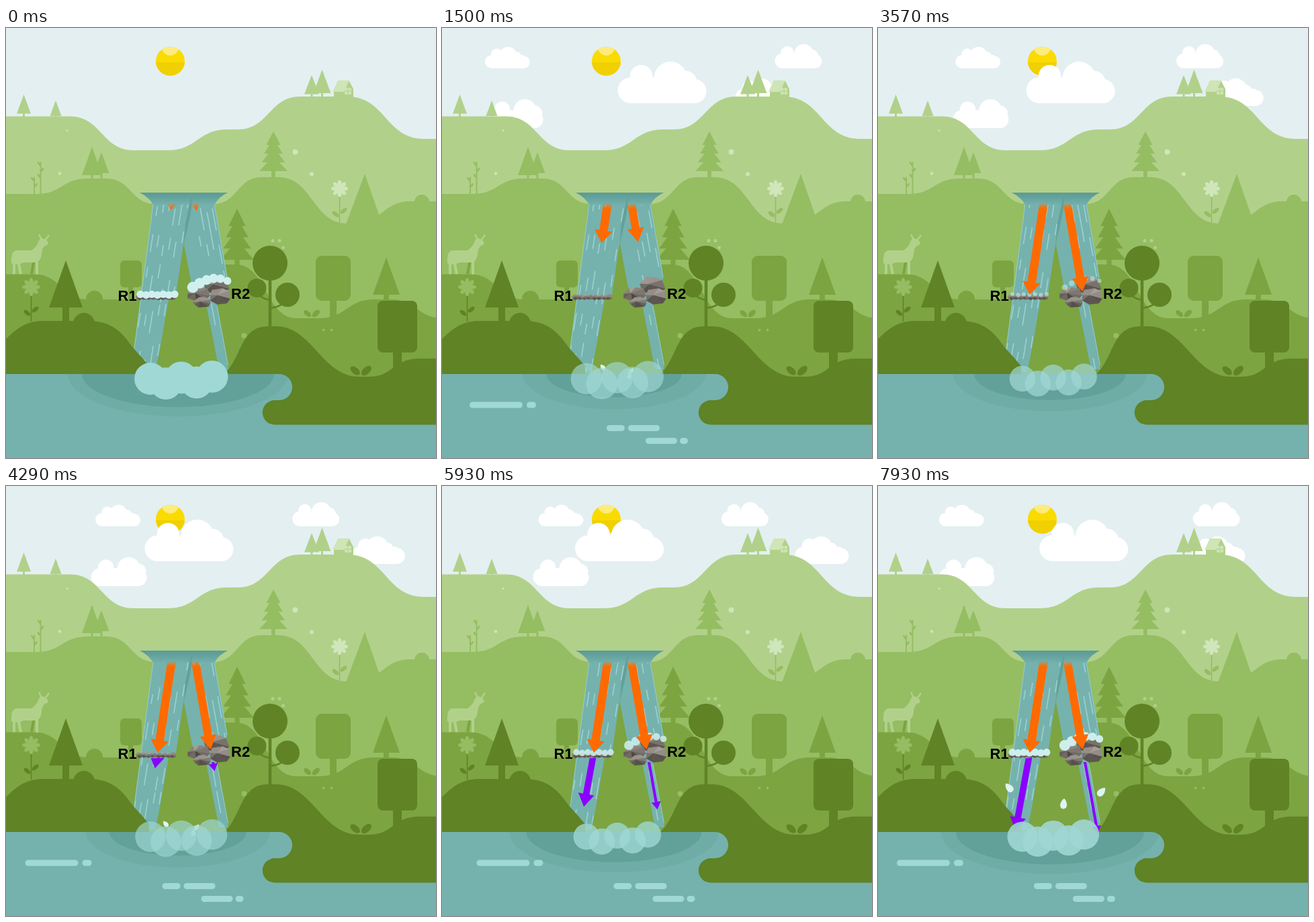
Recreate the animation shown at these times as an HTML page with a canvas. Size 640 px wide and 640 px high, loop 8 s.

```html
<!DOCTYPE html>
<html lang="en">
<head>
<meta charset="utf-8">
<title>Two waterfalls</title>
<style>
html, body { margin: 0; width: 100%; height: 100%; overflow: hidden; background: #e4eff2; }
canvas { display: block; width: 640px; height: 640px; }
</style>
</head>
<body>
<canvas id="stage" width="640" height="640"></canvas>
<script>
const c = document.getElementById('stage').getContext('2d');
const LOOP = 8000, PULSE = 2720, TAU = Math.PI * 2;
const PALE = '#cfe5b6', G1 = '#b1d18a', G2 = '#95bd62', G3 = '#7ca441', G4 = '#5f8325';
const WATER = '#75b2ae', DEEP = '#62a09a', FOAM = '#a0d8d5', SPRAY = '#d0f0ef';

const clamp = v => Math.max(0, Math.min(1, v));

function random(seed) {
  return () => (seed = (seed * 16807) % 2147483647) / 2147483647;
}

function fill(d, color) {
  c.fillStyle = color;
  c.fill(new Path2D(d));
}
function dot(x, y, r, color) {
  oval(x, y, r, r, 0, color);
}
function oval(x, y, rx, ry, turn, color) {
  c.fillStyle = color;
  c.beginPath();
  c.ellipse(x, y, rx, ry, turn, 0, TAU);
  c.fill();
}
function box(x, y, w, h, r, color) {
  c.fillStyle = color;
  c.beginPath();
  c.roundRect(x, y, w, h, r);
  c.fill();
}
function line(d, width, color) {
  c.strokeStyle = color;
  c.lineWidth = width;
  c.stroke(new Path2D(d));
}

// A flat skyline at height y that eases to a new height in each step [from, to, height]
function ridge(y, steps, color) {
  let d = `M0 ${y}`;
  for (const [from, to, next] of steps) {
    const mid = (from + to) / 2;
    d += `H${from}C${mid} ${y} ${mid} ${next} ${to} ${next}`;
    y = next;
  }
  fill(d + 'H640V520H0Z', color);
}

function spruce(x, top, base, half, ground, trunk, color) {
  fill(`M${x} ${top}L${x + half} ${base}H${x - half}Z`, color);
  box(x - trunk / 2, base - 1, trunk, ground - base + 3, 0, color);
}
function fir(x, top, base, half, ground, color) {
  const h = base - top, tiers = 4;
  for (let i = 0; i < tiers; i++) {
    const k = i / (tiers - 1), w = half * (0.5 + 0.5 * k), y = top + h * (0.34 + 0.66 * k);
    fill(`M${x} ${i ? y - h * 0.38 : top}L${x + w} ${y}H${x - w}Z`, color);
  }
  box(x - half * 0.14, base - 1, half * 0.28, ground - base + 3, 0, color);
}
function flower(x, y, r, ground, petal, stem) {
  line(`M${x} ${y}V${ground}`, 1.6, stem);
  oval(x - 6, ground - 13, 6, 3, 0.7, stem);
  oval(x + 6, ground - 18, 6, 3, -0.7, stem);
  for (let i = 0; i < 8; i++) {
    const a = i * TAU / 8;
    oval(x + Math.cos(a) * r * 0.62, y + Math.sin(a) * r * 0.62, r * 0.42, r * 0.24, a, petal);
  }
  dot(x, y, r * 0.3, petal);
}
function sprout(x, y, s, color) {
  oval(x - 7 * s, y, 7 * s, 4 * s, 0.7, color);
  oval(x + 7 * s, y, 7.5 * s, 4.3 * s, -0.75, color);
}
function twig(x, top, leaves) {
  line(`M${x} 248V${top}`, 2, G2);
  for (let i = 0; i < leaves; i++) {
    const side = i % 2 ? 1 : -1;
    oval(x + side * 2.5, top + 3 + i * 9, 3.5, 1.5, -side, G2);
  }
}

function sun() {
  dot(244.5, 49.5, 21.5, '#fadb00');
  c.save();
  c.beginPath();
  c.arc(244.5, 49.5, 21.5, 0, TAU);
  c.clip();
  c.fillStyle = '#f0d000';
  c.fillRect(220, 51, 50, 25);
  dot(244.5, 28.5, 12.5, '#fdec7c');
  c.restore();
}

// Two round ends, a side bump and a main bump at the fraction m of the width
function cloud(x, base, w, h, m) {
  const end = h * 0.3;
  const lobe = (px, top, r) => {
    c.moveTo(px + r, base - top + r);
    c.arc(px, base - top + r, r, 0, TAU);
  };
  c.fillStyle = '#fff';
  c.beginPath();
  c.rect(x + end, base - h * 0.62, w - end * 2, h * 0.62);
  lobe(x + end, h * 0.62, h * 0.31);
  lobe(x + w - end, h * 0.58, h * 0.29);
  lobe(x + w * 0.26, h * 0.92, h * 0.27);
  lobe(x + w * m, h, h * 0.4);
  lobe(x + w * (m + 0.17), h * 0.78, h * 0.27);
  c.fill();
}

// Clouds drift together, rest, then drift apart again
function clouds(t) {
  const u = t < 5150 ? 5150 - t : Math.max(0, t - 5520) * 1.065;
  c.globalAlpha = clamp((t - 480) / 320);
  cloud(190 + 0.0198 * u, 112, 132, 62, 0.59);
  cloud(154.7 - 0.0248 * u, 60, 67, 32, 0.51);
  cloud(405.3 + 0.0248 * u, 60, 70, 36, 0.61);
  cloud(145.3 - 0.0212 * u, 149, 83, 43, 0.67);
  cloud(538 - 0.0277 * u, 116, 80, 41, 0.48);
  c.globalAlpha = 1;
}

function farHills() {
  spruce(26.5, 99, 127.5, 10.5, 131, 3, G1);
  spruce(74, 108, 131, 8.5, 132, 2, G1);
  spruce(455, 70, 98.5, 11, 102, 3, G1);
  spruce(470.5, 62, 97, 13, 102, 3, G1);
  fill('M488 93L511 79L517 91V104H488Z', G1);
  fill('M486 95L494 78H511L503 95Z', PALE);
  box(504, 89, 10, 10, 2, PALE);
  line('M509 89V99M504 94H514', 1, G1);
  ridge(131.5, [[95, 190, 182], [240, 330, 151], [345, 438, 102], [508, 622, 165]], G1);
  dot(91, 152.5, 1.5, PALE);
  dot(80, 216.5, 2.3, PALE);
  dot(430.5, 184.5, 4, PALE);
  dot(455, 217.5, 3, PALE);

  spruce(128, 177, 219, 15, 224, 3, G2);
  spruce(142, 185, 216, 11.5, 224, 3, G2);
  twig(42, 222, 2);
  twig(51.5, 199, 3);
  fir(398, 154, 213, 21, 222, G2);
  fill('M534 217L560 292H506Z', G2);
  flower(496.5, 239, 12, 290, '#d0e6bb', G2);
  dot(619, 259, 11, G2);
  ridge(247, [[45, 122, 224], [150, 222, 262], [309, 380, 222], [405, 508, 291], [518, 602, 258]], G2);
}

function deer() {
  line('M42 344L38 366', 4, G3);
  line('M46 340V367M12 345V367M18 345L22 367', 4, G1);
  fill('M8 350Q7 331 16 331H38Q46 326 49 316L60 322Q54 326 53 336Q52 348 44 349H26Q18 354 8 350Z', G1);
  oval(56, 318.5, 7, 4.5, 0.5, G1);
  line('M53 315L49 307M59 315L64 308', 2.5, G1);
}

function midHills() {
  deer();
  dot(397, 316.5, 2.6, G1);
  dot(407, 316.5, 2.6, G1);
  dot(412.5, 327, 2.4, G1);
  box(170, 346, 32, 40, 6, G3);
  box(182, 384, 7, 22, 0, G3);
  dot(131.5, 403.5, 12.5, G3);
  fir(344, 269, 345, 25, 352, G3);
  box(461, 339, 52, 67, 9, G3);
  box(482, 404, 10, 30, 0, G3);
  spruce(566, 341.5, 397, 20, 404, 8, G3);
  sprout(455, 425, 0.9, G3);
  fill('M265 318L240 420H310Z', G3);
  ridge(366.5, [[42, 122, 404], [324, 326, 352], [342, 432, 432], [466, 548, 404], [574, 650, 432]], G3);
  dot(472.5, 449.5, 1.9, G2);
  dot(484.5, 449.5, 1.9, G2);
  dot(354.5, 458, 4, G2);
}

const leftFall = 'M219.5 256L277 250L264 322L253 397L242 404L229 478L222 512H200L190.5 478Z';
const rightFall = 'M276 252L309.5 256L329.5 372L314 412L331 508H317L298 412L277 386L265 322Z';

function streaks(t, path, x0, lean, seed) {
  const rnd = random(seed), span = 290;
  c.save();
  c.clip(new Path2D(path));
  c.strokeStyle = 'rgba(170,219,218,.8)';
  c.lineWidth = 1.5;
  c.beginPath();
  for (let i = 0; i < 30; i++) {
    const len = 14 + rnd() * 20;
    const y = 235 + (Math.floor(i / 6) * span / 5 + rnd() * 40 + t * 0.078) % span;
    const x = x0 + (i % 6) * 9 + lean * (y - 262);
    c.moveTo(x, y);
    c.lineTo(x + lean * len, y + len);
  }
  c.stroke();
  c.restore();
}

function falls(t) {
  fill(rightFall, WATER);
  streaks(t, rightFall, 279, 0.18, 41);
  line('M310 262L329 371M314 414L330.5 502', 1, '#98cfcc');
  fill(leftFall, WATER);
  streaks(t, leftFall, 226, -0.16, 97);
  line('M219 262L191 477', 1, '#98cfcc');
  fill('M275.5 252H278.5L274 280L264.5 322L267 292Z', DEEP);
  const g = c.createLinearGradient(0, 245, 0, 264);
  g.addColorStop(0, '#5c9a96');
  g.addColorStop(0.3, '#62a09b');
  g.addColorStop(1, WATER);
  fill('M199 245H330Q317 251 310 263H219Q213 252 199 245Z', g);
  line('M276.5 253L274 264', 2.5, DEEP);
}

function pool(d) {
  c.fillStyle = WATER;
  c.fillRect(0, 515, 640, 125);
  const half = (rx, ry, color) => {
    c.fillStyle = color;
    c.beginPath();
    c.ellipse(256, 515, rx, ry, 0, 0, Math.PI);
    c.fill();
  };
  const outer = 164 - 28.5 * d, inner = 143 - 43.5 * d;
  half(outer, outer * 0.385, '#70aca6');
  half(inner, inner * 0.344, DEEP);
}

function nearHills() {
  spruce(89, 346, 416, 25, 436, 10, G4);
  dot(116, 440, 16, G4);
  flower(37.5, 385.5, 13, 437, G2, G4);
  fill('M0 463C18 445 32 436 56 436H124C164 436 178 462 190 477Q202 490 213 503V515H0Z', G4);

  line('M393 370V446', 4.5, G4);
  line('M374 390Q376 402 393 405M418 400Q416 414 393 417', 2.5, G4);
  dot(393, 350, 26, G4);
  dot(373.5, 387, 14, G4);
  dot(419, 397, 18, G4);
  box(553, 406, 59, 77, 8, G4);
  box(576, 480, 13, 32, 0, G4);
  box(490, 510, 80, 14, 0, G3);
  sprout(528, 510, 1.2, G4);
  fill('M325 515C352 490 348 444 390 444H402C456 444 470 519 526 519H540C578 519 574 492 616 492H640V590.5H400A18 18 0 0 1 400 554H406.5A19.5 19.5 0 0 0 406.5 515Z', G4);
}

function glints(t) {
  if (t < 60) return;
  const age = Math.max(0, t - 73) % 3680, x = 21 + age * 0.01398;
  const pair = (dx, y, first, gap, second) => {
    box(x + dx, y, first, 9, 4.5, FOAM);
    box(x + dx + first + gap, y, second, 9, 4.5, FOAM);
  };
  c.globalAlpha = clamp((age + 60) / 240) * clamp((3420 - age) / 450);
  pair(0, 556.5, 79, 6, 14);
  pair(204, 591, 27, 5, 47);
  pair(262, 610, 47, 4, 12);
  c.globalAlpha = 1;
}

// An uneven boulder of facets, lit from above
function boulder(x, y, rx, ry, seed) {
  const rnd = random(seed), n = 8;
  const px = x + (rnd() - 0.5) * rx * 0.6, py = y - ry * 0.15;
  const rim = Array.from({ length: n }, (_, i) => {
    const a = (i + rnd() * 0.5) * TAU / n, k = 0.88 + rnd() * 0.2;
    return [x + Math.cos(a) * rx * k, y + Math.sin(a) * ry * k];
  });
  rim.forEach(([ax, ay], i) => {
    const [bx, by] = rim[(i + 1) % n];
    const light = clamp(0.5 - ((ay + by) / 2 - y) / ry * 0.4 + (rnd() - 0.5) * 0.35);
    const tone = 72 + light * 95;
    const color = `rgb(${tone + 6},${tone - 1},${tone - 7})`;
    const d = `M${px} ${py}L${ax} ${ay}L${bx} ${by}Z`;
    fill(d, color);
    line(d, 0.5, color);
  });
}

function rocks() {
  for (let i = 0; i < 8; i++) boulder(198 + i * 7.2, 400.5, 5.2, 4, 311 + i * 97);
  boulder(314, 383, 20, 13, 1201);
  boulder(286, 396, 17, 11, 733);
  boulder(319, 399, 17, 12, 5077);
  boulder(292, 408, 14, 8, 2909);
}

function rockFoam(d) {
  const s = Math.sqrt(clamp((0.95 - d) / 0.93));
  c.globalAlpha = s;
  for (let i = 0; i < 7; i++) dot(200 + i * 8.5, 396.3 + i % 2, 5.6 * s, SPRAY);
  for (let i = 0; i < 6; i++)
    dot(278 + i * 10.3, 386 - 13.5 * Math.sin(i * 0.47), (8.3 - i * 0.5) * s, SPRAY);
  c.globalAlpha = 1;
}

function drops(p) {
  if (p < 0.52 || p > 0.98) return;
  const g = Math.pow(Math.max(0, (p - 0.54) / 0.298), 1.3);
  const size = Math.min(1, 0.65 + g * 0.4);
  c.globalAlpha = clamp((p - 0.52) / 0.03) * clamp((0.98 - p) / 0.05);
  const drop = (x, y, turn) => {
    c.save();
    c.translate(x, y);
    c.rotate(turn);
    c.scale(size, size);
    fill('M0 -8.5C4 -5 5.5 0 4.7 3.5C3.5 8.5 -3.5 8.5 -4.7 3.5C-5.5 0 -4 -5 0 -8.5Z', '#dff3f2');
    c.restore();
  };
  drop(240 - 33 * g, 506 - 42 * g, -0.7);
  drop(279 - 2 * g, 518 - 33 * g, 0.1);
  drop(281 + 38 * g, 511 - 41 * g, 0.75);
  c.globalAlpha = 1;
}

function poolFoam(p, d) {
  const r = 21.2 + 2.7 * Math.cos(2 * TAU * p);
  c.globalAlpha = 1 - 0.34 * Math.pow(d, 0.4);
  for (let i = 0; i < 5; i++) dot(215 + i * 22.9, 522 - i * 0.8 + i % 2 * 8, r, FOAM);
  c.globalAlpha = 1;
}

// Arrow sliding out from under the line y = top
function arrow(x0, top, tipY, lean, shaft, headW, headL, color) {
  if (tipY <= top) return;
  const s = shaft / 2, h = headW / 2;
  c.save();
  c.beginPath();
  c.rect(0, top, 640, 640);
  c.clip();
  c.translate(x0 + lean * (tipY - top), tipY);
  c.rotate(-Math.atan(lean));
  c.beginPath();
  c.moveTo(0, 0);
  c.lineTo(h, -headL);
  c.lineTo(s, -headL);
  c.lineTo(s, -200);
  c.lineTo(-s, -200);
  c.lineTo(-s, -headL);
  c.lineTo(-h, -headL);
  c.closePath();
  // Back to stage coordinates, so that a gradient stays at the top line
  c.setTransform(1, 0, 0, 1, 0, 0);
  c.fillStyle = color;
  c.fill();
  c.restore();
}

function arrows(t) {
  const g = c.createLinearGradient(0, 259, 0, 269);
  g.addColorStop(0, 'rgba(255,106,0,0)');
  g.addColorStop(1, '#ff6a00');
  const out = clamp((t - 409) / 2807);
  arrow(246.5, 262, 271 + 126 * out, -0.153, 12.5, 27, 19, g);
  arrow(282, 262, 272 + 120 * out, 0.173, 12, 25, 21, g);

  const run = t < 5150 ? t : Math.max(5150, t - 370);
  const gone = 0.0449 * (run - 5000);
  arrow(224.5, 405, Math.min(512, 452 + gone), -0.185, 9.5, 24, 19, '#8b00ff');
  arrow(308, 411, Math.min(517, 456 + gone), 0.18, 4, 14, 11, '#8b00ff');
}

function labels() {
  c.fillStyle = '#000';
  c.font = 'bold 22px "Liberation Sans", Arial, sans-serif';
  c.fillText('R1', 166.5, 406);
  c.fillText('R2', 335, 403);
}

function draw(t) {
  const p = t / PULSE % 1, d = (1 - Math.cos(p * TAU)) / 2;
  c.fillStyle = '#e4eff2';
  c.fillRect(0, 0, 640, 640);
  sun();
  clouds(t);
  farHills();
  midHills();
  falls(t);
  pool(d);
  nearHills();
  glints(t);
  rocks();
  rockFoam(d);
  arrows(t);
  drops(p);
  poolFoam(p, d);
  labels();
}

const start = performance.now();
function tick() {
  draw((performance.now() - start) % LOOP);
  requestAnimationFrame(tick);
}
tick();
</script>
</body>
</html>
```
